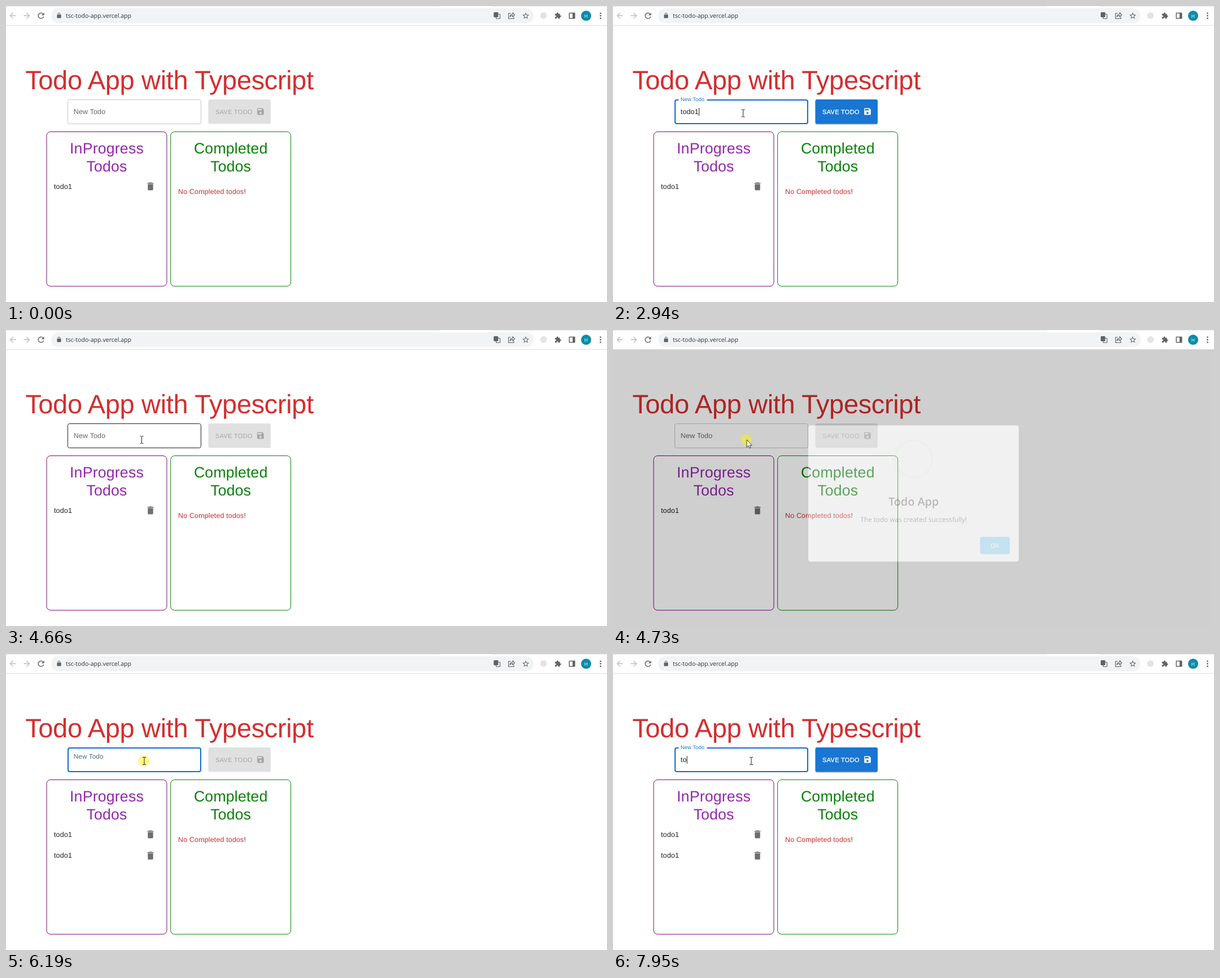
Write an HTML page that moves like this. It is 1065 px wide and 526 px high and loops after 8 s.

```html
<!DOCTYPE html>
<html lang="en">
<head>
<meta charset="utf-8">
<title>Todo App</title>
<style>
  html, body { margin: 0; width: 100%; height: 100%; overflow: hidden; background: #fff; }
  svg { display: block; width: 100%; height: 100%; }
  text { font-family: "Liberation Sans", Arial, sans-serif; text-rendering: geometricPrecision; white-space: pre; }
  .ui { font-family: "Open Sans", "Noto Sans", sans-serif; }
  .body { font-size: 12.55px; letter-spacing: .00938em; }
  .h4 { font-size: 26.7px; letter-spacing: .00735em; text-anchor: middle; }
  .mid { text-anchor: middle; }
</style>
</head>
<body>
<svg viewBox="0 0 1065 526" preserveAspectRatio="none">
  <g id="page"></g>
  <g id="live"></g>
</svg>
<script>
const LOOP = 8000;
const ICON = {
  back: 'M20 11H7.83l5.59-5.59L12 4l-8 8 8 8 1.41-1.41L7.83 13H20v-2z',
  next: 'M4 11h12.17l-5.59-5.59L12 4l8 8-8 8-1.41-1.41L16.17 13H4v-2z',
  reload: 'M17.65 6.35C16.2 4.9 14.21 4 12 4c-4.42 0-7.99 3.58-7.99 8s3.57 8 7.99 8c3.73 0 6.84-2.55 7.73-6h-2.08c-.82 2.33-3.04 4-5.65 4-3.31 0-6-2.69-6-6s2.69-6 6-6c1.66 0 3.14.69 4.22 1.78L13 11h7V4l-2.35 2.35z',
  lock: 'M18 8h-1V6c0-2.76-2.24-5-5-5S7 3.24 7 6v2H6c-1.1 0-2 .9-2 2v10c0 1.1.9 2 2 2h12c1.1 0 2-.9 2-2V10c0-1.1-.9-2-2-2zM9 6c0-1.66 1.34-3 3-3s3 1.34 3 3v2H9V6z',
  star: 'M22 9.24l-7.19-.62L12 2 9.19 8.63 2 9.24l5.46 4.73L5.82 21 12 17.27 18.18 21l-1.63-7.03L22 9.24zM12 15.4l-3.76 2.27 1-4.28-3.32-2.88 4.38-.38L12 6.1l1.71 4.04 4.38.38-3.32 2.88 1 4.28L12 15.4z',
  puzzle: 'M20.5 11H19V7c0-1.1-.9-2-2-2h-4V3.5C13 2.12 11.88 1 10.5 1S8 2.12 8 3.5V5H4c-1.1 0-2 .9-2 2v3.8h1.5c1.49 0 2.7 1.21 2.7 2.7s-1.21 2.7-2.7 2.7H2V20c0 1.1.9 2 2 2h3.8v-1.5c0-1.49 1.21-2.7 2.7-2.7s2.7 1.21 2.7 2.7V22H17c1.1 0 2-.9 2-2v-4h1.5a2.5 2.5 0 0 0 0-5z',
  bin: 'M6 19c0 1.1.9 2 2 2h8c1.1 0 2-.9 2-2V7H6v12zM19 4h-3.5l-1-1h-5l-1 1H5v2h14V4z',
  save: 'M17 3H5c-1.11 0-2 .9-2 2v14c0 1.1.89 2 2 2h14c1.1 0 2-.9 2-2V7l-4-4zm-5 16c-1.66 0-3-1.34-3-3s1.34-3 3-3 3 1.34 3 3-1.34 3-3 3zm3-10H5V5h10v4z'
};

const icon = (name, x, y, s, fill) =>
  `<path d="${ICON[name]}" fill="${fill}" transform="translate(${x} ${y}) scale(${s}) translate(-12 -12)"/>`;
const text = (str, x, y, fill, attrs) => `<text x="${x}" y="${y}" fill="${fill}" ${attrs}>${str}</text>`;
const rect = (x, y, w, h, r, attrs) => `<rect x="${x}" y="${y}" width="${w}" height="${h}" rx="${r}" ${attrs}/>`;
const clamp = v => Math.max(0, Math.min(1, v));
const easeOut = v => 1 - (1 - clamp(v)) ** 3;
const mix = (a, b, p) => `rgb(${a.map((v, i) => Math.round(v + (b[i] - v) * p))})`;
// Value of the last [time, ...] row reached
const latest = (rows, t) => rows.filter(r => r[0] <= t).pop();

const todo = y => text('todo1', 85, y, '#212121', 'class="body"') + icon('bin', 256, y - 4, .785, '#6e6e6e');
const column = (x, color) => rect(x, 223.5, 213, 274.5, 7, `fill="none" stroke="${color}"`);

const GREY = '#5f6368';
document.getElementById('page').innerHTML =
  '<path d="M0 .5H768M862 .5H1065" stroke="#e6e8ea"/><path d="M0 34.5H1065" stroke="#dadce0"/>' +
  icon('back', 12, 17.3, .69, '#b9bcbf') + icon('next', 37, 17.3, .69, '#b9bcbf') + icon('reload', 62, 17.3, .69, GREY) +
  rect(80, 4, 855, 26.5, 13.2, 'fill="#f1f3f4"') + icon('lock', 94, 17, .45, GREY) +
  text('tsc-todo-app.vercel.app', 106, 21, '#303338', 'class="ui" font-size="10.6"') +
  // toolbar on the right
  `<g fill="none" stroke="${GREY}" stroke-width="1.1">` +
  rect(868.5, 14.5, 7, 8, 1, '') + rect(864.8, 11.5, 7, 8, 1, `fill="${GREY}"`) +
  '<path d="M894.5 13h-4v9.5h9.5v-3M893 19c.3-3 2.500-4.500 5-4.500v-2.500l3.500 3.700-3.500 3.700v-2.500c-2.200 0-3.800.6-5 2.100z"/>' +
  rect(998.2, 12.500, 9.600, 9.500, .5, 'stroke-width="1.5"') + '</g>' + rect(1004, 12.5, 4, 9.5, 0, `fill="${GREY}"`) +
  icon('star', 921, 17.3, .6, GREY) +
  '<circle cx="952.500" cy="17" r="6" fill="#e4e4e4"/>' +
  icon('puzzle', 978, 17.3, .52, GREY) +
  '<circle cx="1028" cy="17.300" r="9" fill="#0b8ba9"/>' +
  text('H', 1028, 20.5, '#fff', 'class="ui mid" font-size="8.5"') +
  [12.8, 17.3, 21.8].map(y => `<circle cx="1053.500" cy="${y}" r="1.4" fill="${GREY}"/>`).join('') +
  // page
  text('Todo App with Typescript', 289.5, 148, '#d32f2f', 'class="mid" font-size="47.1" letter-spacing="-.39"') +
  column(72, '#800080') + column(291.7, '#008000') +
  text('InProgress', 178.5, 261.5, '#9327ab', 'class="h4"') + text('Todos', 178.5, 294, '#9327ab', 'class="h4"') +
  text('Completed', 398.3, 261.5, '#0a800a', 'class="h4"') + text('Todos', 398.3, 294, '#0a800a', 'class="h4"') +
  text('No Completed todos<tspan fill="#8a1c2c">!</tspan>', 305, 333.8, '#cc3030', 'class="body"') +
  todo(324.5);

const TYPED = [[0, ''], [1730, 't'], [1930, 'to'], [2070, 'tod'], [2210, 'todo'], [2610, 'todo1'],
  [4130, ''], [7740, 't'], [7880, 'to']];
const CARET = [[990], [1730], [1930], [2070], [2210], [2610], [6330], [7740], [7880]];
const CLICKS = [[940, 1090], [3910, 4080], [4730, 4800], [6190, 6370]];
// start, end, from x, y, to x, y, sag
const MOVES = [[70, 660, 823, 424, 229.5, 190, 0], [2900, 3700, 229.5, 190, 398, 200, 14],
  [4130, 4650, 398, 200, 237, 195, 0], [4730, 4860, 237, 195, 245, 190, 0]];
// time, overlay opacity, dialog opacity
const DIALOG = [[0, 0, 0], [4730, .47, .71], [4800, .5, .4], [4860, .15, .1], [4930, .03, .05], [4990, 0, 0]];

function pointer(t) {
  const [a, b, x0, y0, x1, y1, sag] = latest(MOVES, t);
  const u = clamp((t - a) / (b - a)), e = u * u * (3 - 2 * u);
  return [x0 + (x1 - x0) * e, y0 + (y1 - y0) * e + sag * 4 * e * (1 - e)];
}

function cursor(kind, x, y) {
  const shape = {
    arrow: '<path d="M0 0V13.500L3 10.800 5 15.200 7 14.300 5.100 10H9.200z" fill="#fff" stroke="#222" stroke-width=".9"/>',
    beam: '<path d="M-3-6.500h2.200l.8.700.8-.7H3M0-6V6M-3 6.500h2.200l.8-.7.8.7H3" fill="none" stroke="#222"/>',
    hand: '<path d="M-1 .8C-1-.6 1.500-.6 1.500.8V6C2-0 4 5 4.100 6.500 4.500 5 6.500 5.500 6.500 7 7 6 8.500 6.500 8.500 8V12L7 16.500H0L-4.800 9.800C-5.500 8.300-3.500 7.500-2.500 8.700L-1 10.500z" fill="#fff" stroke="#222" stroke-width=".9"/>'
  }[kind];
  return `<g transform="translate(${x} ${y})">${shape}</g>`;
}

function field(p, focus, hover) {
  const o = focus ? 1 : .5, x0 = 109 + o, x1 = 346 - o, y0 = 166 + o, y1 = 210 - o;
  const [l, r] = p > .8 ? [116.5, 166.5] : [150, 150];
  const stroke = focus ? '#146bc4' : hover ? '#212121' : '#c4c4c4';
  return `<path d="M${r} ${y0}H${x1 - 3}a3 3 0 0 1 3 3V${y1 - 3}a3 3 0 0 1-3 3H${x0 + 3}a3 3 0 0 1-3-3V${y0 + 3}a3 3 0 0 1 3-3H${l}" fill="none" stroke="${stroke}" stroke-width="${2 * o}"/>` +
    text('New Todo', 119.8, 192 - 22.6 * p, mix([102, 102, 102], [25, 118, 210], p),
      `font-size="${12.55 - 3.15 * p}" letter-spacing=".00938em"`);
}

function button(on, hover, ring) {
  const ink = mix([166, 166, 166], [255, 255, 255], on);
  const fill = mix([224, 224, 224], hover ? [21, 101, 192] : [25, 118, 210], on);
  return rect(358.5, 168, 110.500, 43, 3, `fill="#000" opacity="${.22 * on}"`) +
    rect(358.5, 166, 110.500, 43.500, 3, `fill="${fill}" ${ring ? 'stroke="#101820" stroke-width="1.6"' : ''}`) +
    text('SAVE TODO', 371, 191.5, ink, `font-size="11" letter-spacing=".314" stroke="${ink}" stroke-width="${.3 * on}"`) +
    icon('save', 451, 187.5, .654, ink);
}

function dialog(t) {
  const [, p, m] = latest(DIALOG, t);
  if (!p) return '';
  return `<g opacity="${p}">` + rect(0, 35, 1065, 491, 0, 'fill="#000" fill-opacity=".4"') + `<g opacity="${m}">` +
    rect(346, 169.5, 373, 242, 4, 'fill="#fff"') +
    '<circle cx="532.800" cy="229" r="33" fill="none" stroke="#a5dc86" stroke-opacity=".2" stroke-width="3"/>' +
    text('Todo App', 532.8, 311.5, '#000', 'class="ui mid" fill-opacity=".65" font-size="19.8" font-weight="600"') +
    text('The todo was created successfully!', 532.8, 340.5, '#000', 'class="ui mid" fill-opacity=".64" font-size="11.76"') +
    rect(650.5, 367.5, 52.5, 31, 4, 'fill="#7cd1f9"') +
    text('OK', 676.5, 387, '#fff', 'class="ui mid" font-size="11" font-weight="600"') + '</g></g>';
}

function draw(now) {
  const time = now % LOOP;
  const t = Math.floor((time + 4) * 15 / 1000) * 1000 / 15 + 4;
  const typed = latest(TYPED, time)[1];
  const focus = time >= 940 && time < 3910 || time >= 6190;
  const float = time < 4130 ? easeOut((time - 922) / 200)
    : time < 6172 ? 1 - easeOut((time - 4130) / 200) : easeOut((time - 6172) / 200);
  const on = time < 4130 ? clamp((time - 1705) / 250)
    : time < 7700 ? 1 - clamp((time - 4130) / 250) : clamp((time - 7715) / 220);

  const seen = t >= 70, [x, y] = seen ? pointer(t) : [0, 0];
  const within = (l, r) => seen && x > l && x < r && y > 166 && y < 210;
  const covered = time >= 4730 && time < 4800;
  const overField = within(109, 346) && !covered, overButton = within(358, 469) && typed !== '';

  let out = field(float, focus, overField) + button(on, overButton, time >= 3910 && time < 4130) +
    text(typed, 119.8, 192, '#212121', 'class="body"');
  if (time >= 4800) out += todo(362.3);
  if (focus) {
    const since = time - (latest(CARET, time) || [time])[0];
    const w = [...typed].reduce((s, c) => s + (c === 't' ? .287 : .565), 0) * 12.55;
    if (Math.floor(since / 470) % 2 === 0) out += rect(120 + w, 181, 1, 14, 0, 'fill="#222"');
  }
  out += dialog(time);
  if (seen) {
    if (CLICKS.some(([a, b]) => time >= a && time < b))
      out += `<circle cx="${x - 1}" cy="${y}" r="9.800" fill="#fff500" fill-opacity=".5"/>`;
    out += cursor(overField ? 'beam' : overButton ? 'hand' : 'arrow', x, y);
  }
  document.getElementById('live').innerHTML = out;
}

const start = performance.now();
(function tick() {
  draw(performance.now() - start);
  requestAnimationFrame(tick);
})();
</script>
</body>
</html>
```
